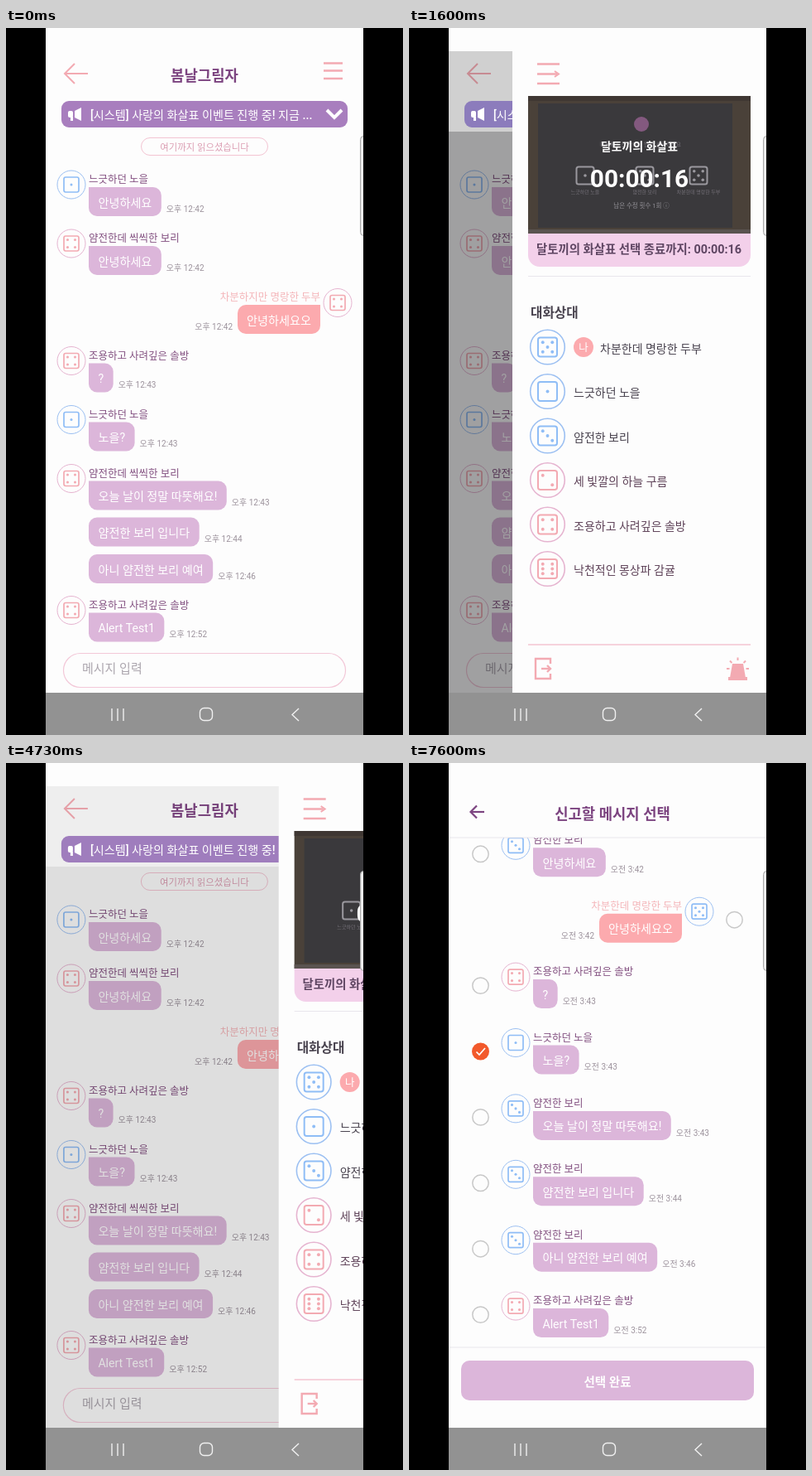
Animation of 480x853 px, one loop 8000 ms. Source, as an HTML page with a canvas:

```html
<!DOCTYPE html>
<html lang="ko">
<head>
<meta charset="utf-8">
<style>
html, body { margin: 0; width: 100%; height: 100%; overflow: hidden; background: #000; }
canvas { display: block; }
</style>
</head>
<body>
<canvas id="stage" width="480" height="853"></canvas>
<script>
const ctx = document.getElementById('stage').getContext('2d');
const LOOP = 8000, STEP = 1000 / 15;
const FONT = 'Roboto, "Noto Sans CJK KR", "Noto Sans CJK JP", sans-serif';
const LEFT = 48, WIDTH = 384, NAV_TOP = 802;
const C = {
  page: '#fdfdfd', bubble: '#dcb6da', mine: '#fcaaae', white: '#fff',
  name: '#835080', title: '#7c4480', mineName: '#f4b6ba', time: '#9c929c',
  blue: '#8fbdf6', blueRing: '#9cc0f2', pink: '#f3aab2', pinkRing: '#e6b4d0',
  gray: '#c8c8c8', rule: '#e9e6ec', dark: '#48424e'
};
const NAMES = {
  calm: '느긋하던 노을', neat: '얌전한데 씩씩한 보리', shortNeat: '얌전한 보리',
  me: '차분하지만 명랑한 두부', meNow: '차분한데 명랑한 두부',
  quiet: '조용하고 사려깊은 솔방', cloud: '세 빛깔의 하늘 구름', dreamer: '낙천적인 몽상파 감귤'
};
const EVENT = '달토끼의 화살표';
const PIPS = { 1: [4], 2: [0, 8], 3: [0, 4, 8], 4: [0, 2, 6, 8], 5: [0, 2, 4, 6, 8], 6: [0, 2, 3, 5, 6, 8] };

const clamp = v => Math.max(0, Math.min(1, v));
const ramp = (t, a, b) => clamp((t - a) / (b - a));
const easeOut = (u, n = 2) => 1 - (1 - u) ** n;
const mix = (a, b, u) => `rgb(${a.map((v, i) => Math.round(v + (b[i] - v) * u))})`;

function scoped(draw) { ctx.save(); draw(); ctx.restore(); }

function rect(x, y, w, h, color) { ctx.fillStyle = color; ctx.fillRect(x, y, w, h); }

function round(x, y, w, h, r, fill, stroke, lw = 1) {
  ctx.beginPath();
  ctx.roundRect(x, y, w, h, r);
  if (fill) { ctx.fillStyle = fill; ctx.fill(); }
  if (stroke) { ctx.strokeStyle = stroke; ctx.lineWidth = lw; ctx.stroke(); }
}

function circle(x, y, r, fill, stroke, lw) { round(x - r, y - r, 2 * r, 2 * r, r, fill, stroke, lw); }

function trace(points) {
  ctx.beginPath();
  for (let i = 0; i < points.length; i += 2) ctx.lineTo(points[i], points[i + 1]);
}

function line(points, color, lw = 1) {
  trace(points);
  ctx.strokeStyle = color; ctx.lineWidth = lw; ctx.stroke();
}

function shape(points, color) {
  trace(points);
  ctx.fillStyle = color; ctx.fill();
}

// y is the vertical middle of the glyphs
function text(s, x, y, size, color, weight = 400, align = 'left') {
  ctx.font = `${weight} ${size}px ${FONT}`;
  ctx.textAlign = align;
  ctx.fillStyle = color;
  ctx.fillText(s, x, y + size * 0.36);
}

function dice(x, y, size, n, color, lw = 1.7) {
  const h = size / 2, gap = size * 0.25;
  round(x - h, y - h, size, size, size * 0.12, null, color, lw);
  for (const p of PIPS[n]) circle(x + (p % 3 - 1) * gap, y + (Math.floor(p / 3) - 1) * gap, size * 0.085, color);
}

function avatar(x, y, n, blue, r = 17, lw = 1) {
  circle(x, y, r, null, blue ? C.blueRing : C.pinkRing, lw);
  dice(x, y, r > 18 ? 23 : 18, n, blue ? C.blue : C.pink, r > 18 ? 2 : 1.7);
}

function bubble(x, y, message, time, first = true) {
  ctx.font = `400 14.1px ${FONT}`;
  const w = ctx.measureText(message).width + 23;
  round(x, y, w, 35, [first ? 0 : 10, 10, 10, 10], C.bubble);
  text(message, x + 11.5, y + 18.5, 14.1, C.white);
  text(time, x + w + 6, y + 26, 10, C.time);
}

function theirs(x, y, name, n, blue, message, time) {
  avatar(x - 21, y + 6.5, n, blue);
  text(name, x, y, 12.5, C.name);
  bubble(x, y + 9.5, message, time);
}

function mine(right, y, name, n, blue, time) {
  avatar(right + 21, y + 7, n, blue);
  text(name, right, y, 12.5, C.mineName, 400, 'right');
  round(right - 100, y + 9.5, 100, 35, [10, 0, 10, 10], C.mine);
  text('안녕하세요오', right - 50, y + 28, 14.1, C.white, 400, 'center');
  text(time, right - 106, y + 36, 10, C.time, 400, 'right');
}

function banner(dim) {
  round(67, 88, 346, 32, 9, mix([168, 126, 190], [140, 124, 188], dim));
  shape([83, 100, 91, 96, 91, 112, 83, 108], C.white);
  round(75, 100, 6, 8, 2, C.white);
  rect(78, 107, 3, 5, C.white);
  text('[시스템] 사랑의 화살표 이벤트 진행 중! 지금 ...', 102, 105, 14.1, C.white, 500);
  line([388, 99, 397, 108, 406, 99], C.white, 4);
}

function chat(dim) {
  rect(LEFT, 0, WIDTH + 40, NAV_TOP, C.page);
  line([99, 55, 71, 55], C.pink, 2);
  line([83, 43, 71, 55, 83, 67], C.pink, 2);
  text('봄날그림자', 240, 57.5, 17.8, C.title, 700, 'center');
  for (const y of [42.5, 51.5, 61]) line([384, y, 407, y], C.pink, 2.5);
  round(163.5, 132.5, 153, 21, 10.5, null, '#f3c4d2');
  text('여기까지 읽으셨습니다', 240, 144, 11.4, '#dc9fb4', 400, 'center');
  theirs(100, 182.5, NAMES.calm, 1, true, '안녕하세요', '오후 12:42');
  theirs(100, 253.5, NAMES.neat, 4, false, '안녕하세요', '오후 12:42');
  mine(380, 324.5, NAMES.me, 4, false, '오후 12:42');
  theirs(100, 395, NAMES.quiet, 4, false, '?', '오후 12:43');
  theirs(100, 466, NAMES.calm, 1, true, '노을?', '오후 12:43');
  theirs(100, 537, NAMES.neat, 4, false, '오늘 날이 정말 따뜻해요!', '오후 12:43');
  bubble(100, 590.5, '얌전한 보리 입니다', '오후 12:44', false);
  bubble(100, 635, '아니 얌전한 보리 예여', '오후 12:46', false);
  theirs(100, 696, NAMES.quiet, 4, false, 'Alert Test1', '오후 12:52');
  round(69.5, 754.5, 341, 41, 20.5, null, '#f3c8d8', 1.2);
  text('메시지 입력', 92, 773, 15, '#aca6ae');
  if (dim > 0) {
    rect(LEFT, 28, WIDTH, 97, `rgba(0,0,4,${0.18 * dim})`);
    rect(LEFT, 125, WIDTH, NAV_TOP - 125, `rgba(0,0,4,${0.37 * dim})`);
  }
  banner(dim);
}

function eventCard(clock) {
  rect(144, 82, 269, 166, '#4a4139');
  rect(144, 82, 269, 6, '#3f3733');
  rect(156, 91, 235, 150, '#3a393c');
  rect(144, 243, 269, 5, '#5a5350');
  circle(281, 116, 9, '#83597f');
  const faint = '#747078';
  text('마음에 드는 상대를 한 명 선택하세요', 280, 141, 6.5, faint, 400, 'center');
  [[213, 1, NAMES.calm], [285, 3, NAMES.shortNeat], [350, 5, NAMES.meNow]].forEach(([x, n, s]) => {
    dice(x, 178, 21, n, '#9a989e', 2);
    text(s, x, 198, 6, faint, 400, 'center');
  });
  text('남은 수정 횟수 1회 ⓘ', 281, 214, 7.5, '#929096', 400, 'center');
  text(EVENT, 278.5, 143, 13.9, C.white, 700, 'center');
  text(clock, 278.5, 181, 29.8, C.white, 700, 'center');
  round(144, 248, 269, 40, [0, 0, 14, 14], '#f3d0ea');
  text(`${EVENT} 선택 종료까지: ${clock}`, 278, 267, 14.4, '#5e4562', 700, 'center');
}

function drawer(open, seconds) {
  ctx.translate((1 - open) * 307, 0);
  rect(125, 28, 307, NAV_TOP - 28, C.page);
  line([155, 43.5, 182, 43.5], C.pink, 2.5);
  line([155, 55.5, 179, 55.5], C.pink, 2.5);
  line([155, 67, 182, 67], C.pink, 2.5);
  line([176, 52, 181, 55.5, 176, 59], C.pink, 2);
  eventCard(`00:00:${seconds}`);
  line([144, 299.5, 413, 299.5], C.rule);
  text('대화상대', 147, 343.5, 15.7, C.dark, 700);
  [[NAMES.meNow, 5], [NAMES.calm, 1], [NAMES.shortNeat, 3], [NAMES.cloud, 2], [NAMES.quiet, 4], [NAMES.dreamer, 6]]
    .forEach(([name, n], i) => {
      const y = 385 + i * 53.5;
      avatar(167.5, y, n, i < 3, 20.8, 1.6);
      text(name, i ? 199 : 231, y + 1.5, 14, i < 3 ? C.dark : '#5e4258');
    });
  circle(211, 385, 12, C.mine);
  text('나', 211, 385.5, 12.5, C.white, 400, 'center');
  line([144, 744, 413, 744], '#f4c6d2', 1.3);
  line([171, 767, 171, 761, 153, 761, 153, 785, 171, 785, 171, 779], C.pink, 2.4);
  line([160, 773, 171, 773], C.pink, 2.4);
  line([167, 769, 171, 773, 167, 777], C.pink, 2.4);
  shape([391, 767, 404, 767, 407, 784, 388, 784], C.pink);
  rect(386, 783, 23, 4, C.pink);
  for (let i = 0; i < 5; i++) {
    const a = Math.PI * (1 + i / 4), x = Math.cos(a), y = Math.sin(a);
    line([397.5 + 10 * x, 773 + 10 * y, 397.5 + 13.5 * x, 773 + 13.5 * y], C.pink, 2);
  }
}

function loading(progress, alpha, t) {
  ctx.globalAlpha = alpha;
  ctx.translate((1 - progress) * 38.4, 0);
  rect(LEFT, 28, WIDTH, NAV_TOP - 28, '#f2eff9');
  ctx.globalAlpha = Math.min(1, alpha * 1.2);
  const turn = (t - 4867) / 1000 * Math.PI * 2;
  ctx.beginPath();
  ctx.arc(240, 399, 15, turn - 1.35, turn - 0.08);
  ctx.strokeStyle = '#c6b6ca'; ctx.lineWidth = 3; ctx.stroke();
  text('메시지를 불러오는 중...', 240, 441.5, 16, '#48444c', 400, 'center');
}

function checkBox(x, y, on) {
  if (!on) return circle(x, y, 9.7, null, C.gray, 1.5);
  circle(x, y, 10.5, '#f2592b');
  line([81.5, y + 0.5, 85, y + 4, 92, y - 4], C.white, 1.7);
}

function report(t) {
  const checked = t >= 6860;
  const scroll = 84 * (1 - easeOut(ramp(t, 5070, 5400)));
  const rows = [
    [NAMES.calm, 1, true, '안녕하세요', 42], [NAMES.shortNeat, 3, true, '안녕하세요', 42],
    null,
    [NAMES.quiet, 4, false, '?', 43], [NAMES.calm, 1, true, '노을?', 43],
    [NAMES.shortNeat, 3, true, '오늘 날이 정말 따뜻해요!', 43],
    [NAMES.shortNeat, 3, true, '얌전한 보리 입니다', 44],
    [NAMES.shortNeat, 3, true, '아니 얌전한 보리 예여', 46],
    [NAMES.quiet, 4, false, 'Alert Test1', 52]
  ];
  rect(LEFT, 0, WIDTH, NAV_TOP, C.page);
  scoped(() => {
    ctx.beginPath();
    ctx.rect(LEFT, 90, WIDTH, 615);
    ctx.clip();
    rows.forEach((row, i) => {
      const y = 13.4 + i * 79.4 + scroll;
      checkBox(row ? 86.5 : 393.5, y + 17, checked && i === 4);
      if (!row) return mine(330, y, NAMES.meNow, 5, true, '오전 3:42');
      const [name, n, blue, message, minute] = row;
      theirs(150, y, name, n, blue, message, `오전 3:${minute}`);
    });
  });
  line([91, 59, 75, 59], C.title, 2.2);
  line([82, 51.5, 74.5, 59, 82, 66.5], C.title, 2.2);
  text('신고할 메시지 선택', 246, 61.5, 17.8, C.title, 700, 'center');
  line([LEFT, 90, 432, 90], C.rule);
  line([LEFT, 705, 432, 705], C.rule);
  round(63, 721, 354, 48, 10, mix([206, 206, 206], [220, 182, 218], ramp(t, 6800, 7000)));
  text('선택 완료', 240, 747, 14.5, C.white, 700, 'center');
}

function chrome() {
  round(428.5, 130.5, 10, 120, 4, '#ececec', '#a6a6a6');
  rect(LEFT, NAV_TOP, WIDTH, 853 - NAV_TOP, '#929292');
  const icon = '#f0f0f0';
  for (const x of [128, 135, 142]) line([x, 821, x, 836], icon, 1.4);
  round(234.5, 820.5, 15, 15, 5, null, icon, 1.4);
  line([354, 821, 346, 828.5, 354, 836], icon, 1.4);
}

function draw(now) {
  const t = Math.floor((now % LOOP + 4) / STEP) * STEP;
  rect(0, 0, 480, 853, '#000');
  scoped(() => {
    ctx.beginPath();
    ctx.rect(LEFT, 0, WIDTH, 853);
    ctx.clip();
    if (t >= 4930) {
      report(t);
    } else {
      const open = t < 4600 ? easeOut(ramp(t, 290, 600)) : 1 - ramp(t, 4600, 4800);
      const push = easeOut(ramp(t, 4733, 4978));
      const seconds = 17 - Math.floor(Math.max(0, t - 330) / 1000);
      scoped(() => {
        ctx.translate(-38.4 * push, 0);
        chat(open);
      });
      if (open > 0) scoped(() => drawer(open, seconds));
      if (push > 0) scoped(() => loading(push, 0.8 * ramp(t, 4740, 4867), t));
    }
    chrome();
  });
}

const start = performance.now();
function tick() {
  draw(performance.now() - start);
  requestAnimationFrame(tick);
}
tick();
</script>
</body>
</html>
```
